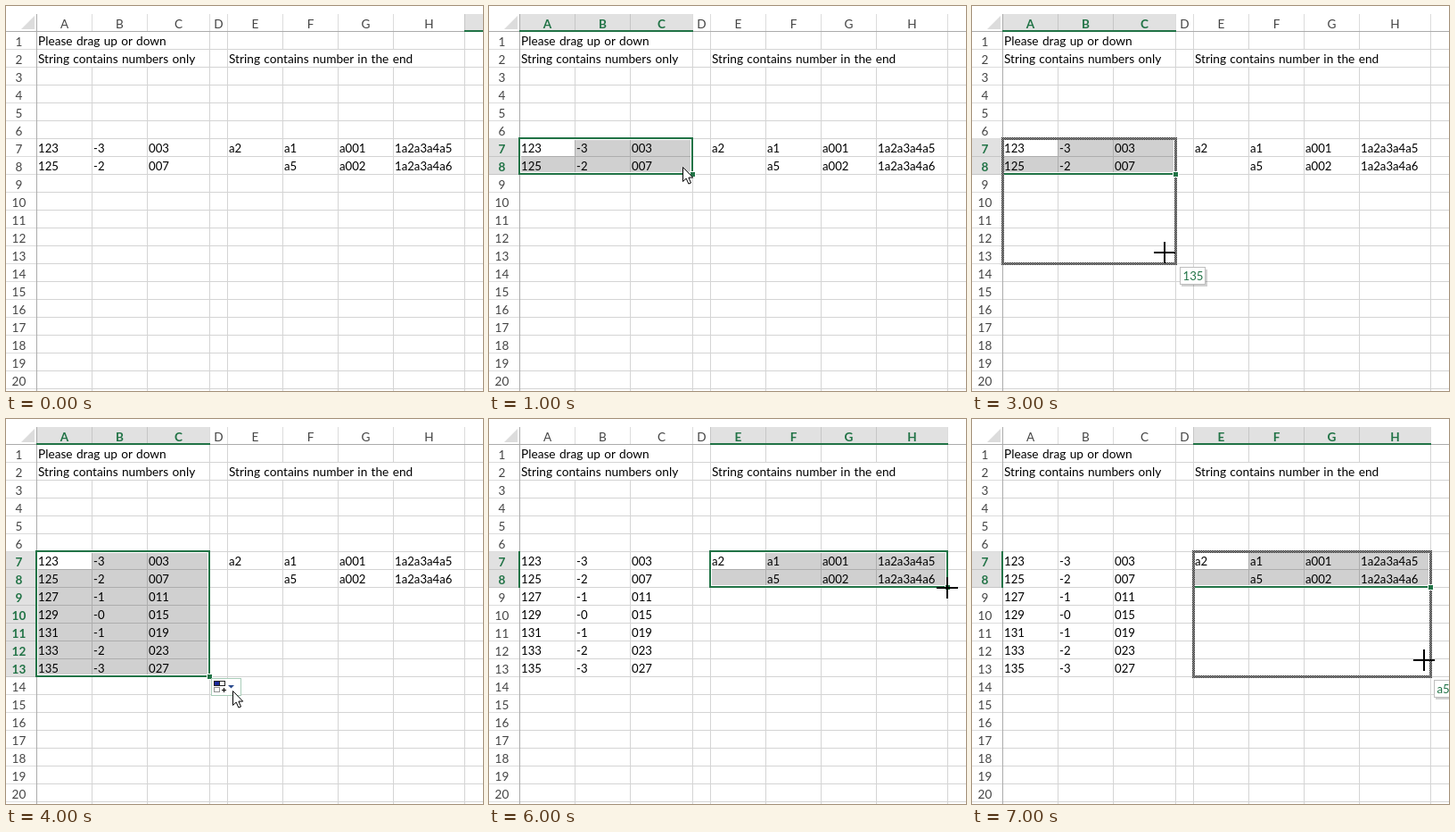
These frames come from a looping animation (535x431 px, 8000 ms). An HTML page:

```html
<!DOCTYPE html>
<html lang="en">
<head>
<meta charset="utf-8">
<title>Spreadsheet fill handle</title>
<style>
html, body { margin: 0; width: 100%; height: 100%; overflow: hidden; background: #fff; }
svg { display: block; width: 535px; height: 431px; font: 13.2px Lato, "Open Sans", sans-serif; }
.head { font-size: 13.6px; fill: #444; text-anchor: middle; }
.on { fill: #217346; font-weight: bold; }
.long { font-size: 13.7px; word-spacing: .8px; }
.tip { fill: #217346; }
</style>
</head>
<body>
<svg id="stage" viewBox="0 0 535 431" xmlns="http://www.w3.org/2000/svg"></svg>
<script>
const W = 535, H = 431, TOP = 28, LEFT = 34, ROW = 20, STEP = 1000;
const GREEN = '#217346';
const edges = [34, 96, 158, 228, 248, 310, 372, 434, 514, 576];
const stage = document.getElementById('stage');

// Selections are [first column, last column, last row]; all start in row 7.
const steps = [
  { cols: [8, 8] },
  { sel: [0, 2, 8], arrow: [217, 180] },
  { sel: [0, 2, 8], cross: [228, 188] },
  { sel: [0, 2, 8], drag: 13, cross: [216, 275], tip: [233, 29, '135'] },
  { sel: [0, 2, 13], filled: true, options: true, arrow: [254, 304] },
  { sel: [4, 5, 8], filled: true, arrow: [363, 177] },
  { sel: [4, 7, 8], filled: true, cross: [514, 188] },
  { sel: [4, 7, 8], filled: true, drag: 13, cross: [507, 269], tip: [518, 24, 'a5'] }
];

const rect = (x, y, w, h, fill, more = '') =>
  `<rect x="${x}" y="${y}" width="${w}" height="${h}" fill="${fill}" ${more}/>`;
const text = (x, y, s, cls = '') => `<text x="${x}" y="${y}" class="${cls}">${s}</text>`;
const rowY = r => TOP + (r - 1) * ROW;
const cell = (c, r, s, cls) => text(edges[c] + 2, rowY(r) + 16, s, cls);

function grid() {
  let out = '';
  for (let y = TOP + ROW; y < H; y += ROW) {
    out += rect(LEFT, y, W - LEFT, 1, '#d4d4d4');
  }
  for (const x of edges.slice(1)) out += rect(x, TOP, 1, H - TOP, '#d4d4d4');
  // Long labels run over their neighbours and hide the grid lines.
  out += rect(35, 29, 193, 19, '#fff') + rect(35, 49, 193, 19, '#fff') + rect(249, 49, 265, 19, '#fff');
  return out;
}

function headers(cols, rows) {
  let out = '<path d="M32 11V26H17Z" fill="#dcdcdc"/>', marks = '';
  const within = (v, range) => range && v >= range[0] && v <= range[1];
  for (let c = 0; c < 9; c++) {
    const x = edges[c], w = edges[c + 1] - x, on = within(c, cols);
    if (on) {
      out += rect(x + 1, 9, w, 19, '#e1e1e1');
      marks += rect(x, 27, w + 1, 2, GREEN);
    }
    out += rect(x, 9, 1, 19, on ? '#c6c6c6' : '#dcdcdc');
    if (c < 8) out += text(x + w / 2 + .5, 24.5, 'ABCDEFGH'[c], on ? 'head on' : 'head');
  }
  for (let r = 1; r <= 20; r++) {
    const y = rowY(r), on = within(r, rows);
    if (on) {
      out += rect(0, y + 1, 34, 20, '#e1e1e1');
      marks += rect(33, y, 2, 21, GREEN);
    }
    out += rect(0, y + ROW, LEFT, 1, on ? '#c6c6c6' : '#dcdcdc');
    out += text(14.5, y + 16.5, r, on ? 'head on' : 'head');
  }
  return out + rect(0, TOP, W, 1, '#ababab') + rect(LEFT, 9, 1, H - 9, '#ababab') + marks;
}

function values(filled) {
  let out = cell(0, 1, 'Please drag up or down', 'long') +
    cell(0, 2, 'String contains numbers only', 'long') +
    cell(4, 2, 'String contains number in the end', 'long') + cell(4, 7, 'a2');
  for (let i = 0; i < (filled ? 7 : 2); i++) {
    out += cell(0, 7 + i, 123 + 2 * i) + cell(1, 7 + i, '-' + Math.abs(3 - i)) +
      cell(2, 7 + i, String(3 + 4 * i).padStart(3, '0'));
  }
  for (let i = 0; i < 2; i++) {
    out += cell(5, 7 + i, 'a' + (1 + 4 * i)) + cell(6, 7 + i, 'a00' + (1 + i)) +
      cell(7, 7 + i, '1a2a3a4a' + (5 + i));
  }
  return out;
}

function shade([first, last, bottom]) {
  const x = edges[first], x1 = edges[first + 1], x2 = edges[last + 1];
  const y = rowY(7), y2 = rowY(bottom + 1);
  return `<path d="M${x1} ${y + 2}H${x2 - 2}V${y2 - 2}H${x + 2}V${y + ROW}H${x1}Z" fill="#000" fill-opacity=".185"/>`;
}

function border([first, last, bottom], drag) {
  const x = edges[first], w = edges[last + 1] - x, y = rowY(7), h = rowY(bottom + 1) - y;
  let out = rect(x, y, w, h, 'none', `stroke="${GREEN}" stroke-width="2"`) +
    rect(x + 1.5, y + 1.5, w - 3, h - 3, 'none', 'stroke="#fff"');
  if (drag) {
    out += rect(x + .5, y + .5, w, rowY(drag + 1) - y, 'none', 'stroke="url(#dots)" stroke-width="3"');
  }
  return out + rect(x + w - 3, y + h - 3, 7, 7, '#fff') + rect(x + w - 2, y + h - 2, 5, 5, GREEN);
}

const arrow = ([x, y]) =>
  `<path transform="translate(${x + .5} ${y + .5})" d="M0 0V16L3.7 12.6L6.4 18.6L9 17.5L6.4 11.6H11.2Z" fill="#fff" stroke="#000"/>`;

const cross = ([x, y]) => rect(x - 12, y, 24, 2, '#000') + rect(x - 1, y - 11, 2, 24, '#000');

const tip = ([x, w, s]) =>
  rect(x + 2, 295, w, 19, '#000', 'opacity=".18"') +
  rect(x + .5, 292.5, w - 1, 19, '#fff', 'stroke="#bebebe"') + text(x + 3.5, 307, s, 'tip');

function options() {
  return rect(230.5, 290.5, 33, 19, '#fff', 'stroke="#a9cdb9"') +
    rect(233.5, 293.5, 12, 5, '#fff', 'stroke="#222"') + rect(234, 294, 6, 4, '#1a2a9c') +
    rect(233.5, 300.5, 6, 5, 'none', 'stroke="#222" stroke-dasharray="1 1"') +
    rect(239, 293, 1, 6, '#222') +
    rect(242, 303, 5, 1, '#000') + rect(244, 301, 1, 5, '#000') +
    '<path d="M249 298H256L252.5 301.5Z" fill="#2a4a8c"/>';
}

const defs = `<defs><pattern id="dots" width="2" height="2" patternUnits="userSpaceOnUse">
  ${rect(0, 0, 2, 2, '#b4b4b4')}${rect(0, 0, 1, 1, '#222')}${rect(1, 1, 1, 1, '#222')}
</pattern></defs>`;

function scene(s) {
  const cols = s.cols || s.sel.slice(0, 2), rows = s.sel && [7, s.sel[2]];
  return defs + rect(0, 0, W, H, '#fff') + grid() + headers(cols, rows) +
    (s.sel ? shade(s.sel) : '') + values(s.filled) +
    (s.sel ? border(s.sel, s.drag) : '') +
    (s.options ? options() : '') + (s.tip ? tip(s.tip) : '') +
    (s.arrow ? arrow(s.arrow) : '') + (s.cross ? cross(s.cross) : '');
}

const scenes = steps.map(scene);
const start = performance.now();
let shown = -1;

function tick() {
  const i = Math.floor((performance.now() - start) / STEP) % scenes.length;
  if (i !== shown) stage.innerHTML = scenes[shown = i];
  requestAnimationFrame(tick);
}
tick();
</script>
</body>
</html>
```
